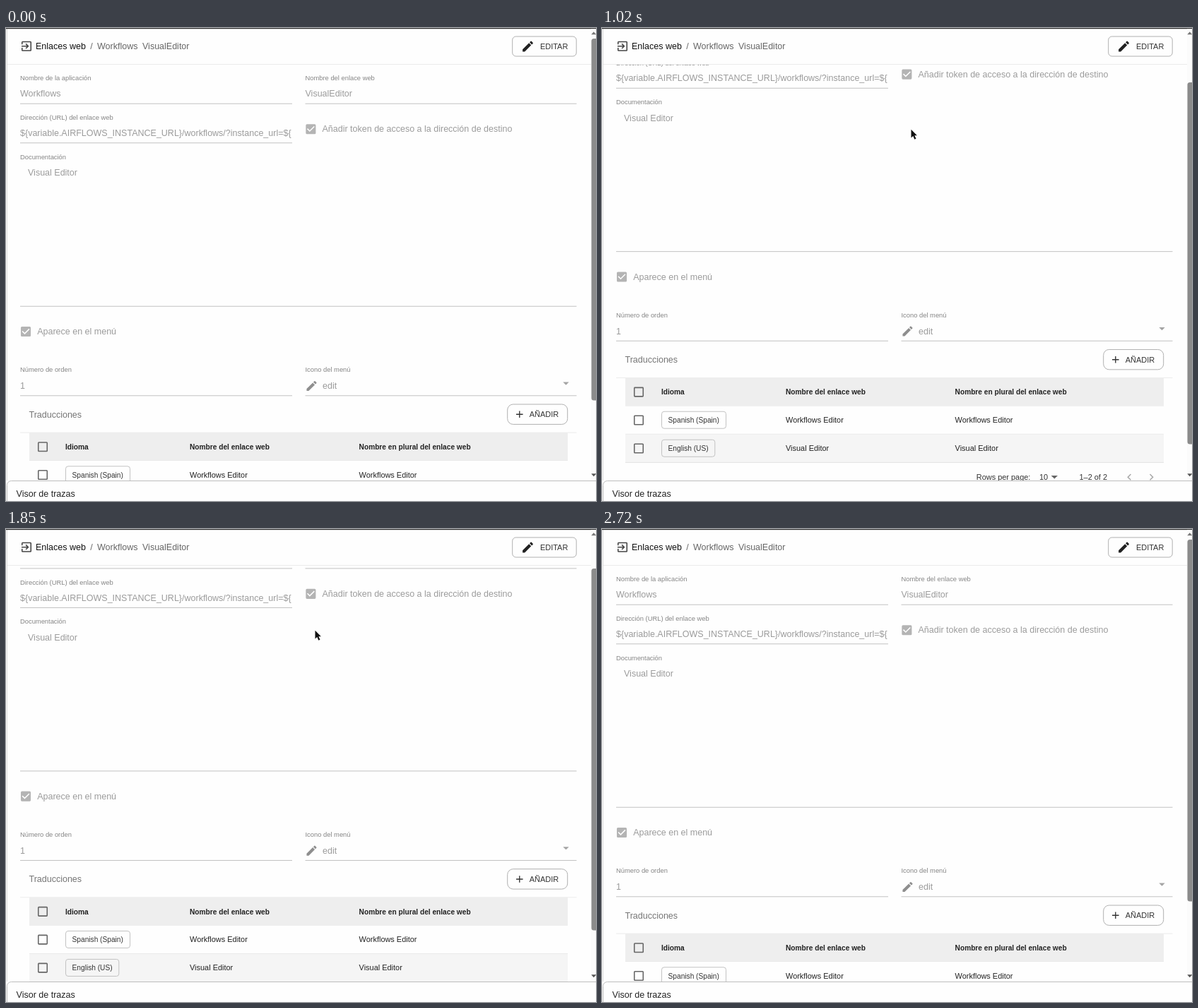
An HTML page that plays this animation: 835 by 670 pixels, repeating every 3010 ms.

```html
<!DOCTYPE html>
<html lang="es">
<head>
<meta charset="utf-8">
<title>Enlaces web</title>
<style>
html, body { margin: 0; width: 100%; height: 100%; overflow: hidden; background: #fefefe; }
svg { display: block; width: 835px; height: 670px; font-family: "Liberation Sans", Arial, sans-serif; }
text { white-space: pre; }
</style>
</head>
<body>
<svg id="stage" viewBox="0 0 835 670">
  <defs>
    <clipPath id="view"><rect x="0" y="51.5" width="828" height="589.5"/></clipPath>
    <clipPath id="urlBox"><rect x="20" y="135" width="385" height="26"/></clipPath>
  </defs>
  <rect width="835" height="670" fill="#fefefe"/>
  <g clip-path="url(#view)"><g id="page"></g></g>
  <g id="head"></g>
  <g id="bar"></g>
  <g id="foot"></g>
  <path id="cursor" d="M0 0V11.8L2.8 9.2L4.8 13.9L7 12.9L4.9 8.4H8.4Z" fill="#111" stroke="#fff" stroke-width="1" stroke-linejoin="round" paint-order="stroke"/>
</svg>
<script>
const LOOP = 3010, MAX_SCROLL = 124.7;
const $ = id => document.getElementById(id);
const BIG = 12.5, MID = 10.94, CELL = 10.16, SMALL = 9.375;
const GREY = "#9b9b9b", LABEL = "#858585", DARK = "#222", SOFT = "#666";

const icons = {
  edit: "M3 17.25V21h3.75L17.81 9.94l-3.75-3.75L3 17.25zM20.71 7.04a1 1 0 0 0 0-1.41l-2.34-2.34a1 1 0 0 0-1.41 0l-1.83 1.83 3.75 3.75 1.83-1.83z",
  checked: "M19 3H5a2 2 0 0 0-2 2v14a2 2 0 0 0 2 2h14a2 2 0 0 0 2-2V5a2 2 0 0 0-2-2zm-9 14l-5-5 1.41-1.41L10 14.17l7.59-7.59L19 8l-9 9z",
  empty: "M19 5v14H5V5h14m0-2H5a2 2 0 0 0-2 2v14a2 2 0 0 0 2 2h14a2 2 0 0 0 2-2V5a2 2 0 0 0-2-2z",
  enter: "M10.09 15.59L11.5 17l5-5-5-5-1.41 1.41L12.67 11H3v2h9.67l-2.58 2.59zM19 3H5a2 2 0 0 0-2 2v4h2V5h14v14H5v-4H3v4a2 2 0 0 0 2 2h14a2 2 0 0 0 2-2V5a2 2 0 0 0-2-2z",
  plus: "M19 13h-6v6h-2v-6H5v-2h6V5h2v6h6v2z",
  down: "M6 9l6 6 6-6z",
  prev: "M15.41 7.41L14 6l-6 6 6 6 1.41-1.41L10.83 12z",
  next: "M10 6L8.59 7.41 13.17 12l-4.58 4.59L10 18l6-6z"
};

const text = (x, y, s, size = BIG, fill = GREY, extra = "") =>
  `<text x="${x}" y="${y}" font-size="${size}" fill="${fill}" ${extra}>${s}</text>`;
const rect = (x, y, w, h, fill, extra = "") =>
  `<rect x="${x}" y="${y}" width="${w}" height="${h}" fill="${fill}" ${extra}/>`;
const box = (x, y, w, h, r, stroke) =>
  rect(x, y, w, h, "#fefefe", `rx="${r}" stroke="${stroke}"`);
const icon = (name, cx, cy, fill, k = 0.78125) =>
  `<path d="${icons[name]}" fill="${fill}" transform="translate(${cx - 12 * k} ${cy - 12 * k}) scale(${k})"/>`;
const line = (x, y, w, fill = "#c2c2c2") => rect(x, y, w, 1, fill);
const label = (x, y, s) => text(x, y, s, SMALL, LABEL);

function row(y, lang, chipWidth, name, fill) {
  return rect(33, y, 762, 40, fill) + line(33, y + 39.4, 762, "#e2e2e2") +
    icon("empty", 52, y + 20, SOFT) +
    rect(84.5, y + 7.8, chipWidth, 24, fill, 'rx="3.5" stroke="#c2c2c2"') +
    text(93.6, y + 23.5, lang, CELL, "#333") +
    [260, 499.6].map(x => text(x, y + 23.7, name, MID, DARK)).join("");
}

$("page").innerHTML = [
  label(20, 73.7, "Nombre de la aplicación"), text(20, 97.3, "Workflows"), line(20, 106.7, 385),
  label(423.5, 73.7, "Nombre del enlace web"), text(423.5, 97.3, "VisualEditor"), line(423.5, 106.7, 384),
  label(20, 130.2, "Dirección (URL) del enlace web"),
  text(20, 153, "${variable.AIRFLOWS_INSTANCE_URL}/workflows/?instance_url=${", BIG, GREY, 'clip-path="url(#urlBox)"'),
  line(20, 162.3, 385),
  icon("checked", 431.4, 143.2, "#b4b4b4"),
  text(447.5, 147.3, "Añadir token de acceso a la dirección de destino"),
  label(20, 185.7, "Documentación"), text(31, 209.2, "Visual Editor"), line(20, 393.7, 787.5),
  icon("checked", 28, 430, "#b4b4b4"), text(44.2, 434.3, "Aparece en el menú"),
  label(20, 487.4, "Número de orden"), text(20, 511.2, "1"), line(20, 520.3, 385),
  label(423.5, 487.4, "Icono del menú"), icon("edit", 432.5, 507, "#8e8e8e"),
  text(448, 511.2, "edit"), line(423.5, 520.3, 384), icon("down", 792.5, 503.6, "#a4a4a4", 0.7),
  text(32.5, 551.8, "Traducciones", BIG, "#757575"),
  box(709.7, 533, 85, 28.4, 8, "#b0b0b0"), icon("plus", 726.8, 547.3, "#333", 0.68),
  text(740.8, 551.1, "AÑADIR", MID, "#333"),
  line(20, 572.6, 787.5, "#ececec"),
  rect(33, 573.2, 762, 40, "#eeeeee"), line(33, 612.6, 762, "#e2e2e2"),
  icon("empty", 52, 593.2, SOFT),
  [[84, "Idioma"], [260, "Nombre del enlace web"], [499.6, "Nombre en plural del enlace web"]]
    .map(([x, s]) => text(x, 596.9, s, CELL, DARK, 'font-weight="bold"')).join(""),
  row(613, "Spanish (Spain)", 91, "Workflows Editor", "#fefefe"),
  row(653, "English (US)", 75.3, "Visual Editor", "#f5f5f5"),
  text(529.8, 717.4, "Rows per page:", MID, "#333"), text(619, 717.4, "10", MID, "#333"),
  icon("down", 640.3, 713.8, SOFT), text(675.5, 717.4, "1–2 of 2", MID, "#333"),
  icon("prev", 746.3, 713.7, "#aaa"), icon("next", 777.6, 713.7, "#aaa")
].join("");

$("head").innerHTML = [
  line(2, 51, 826, "#ebebeb"), rect(1, 1, 1, 640, "#dcdcdc"), rect(0, 0, 835, 1.2, "#2b2b2b"),
  icon("enter", 29, 25.7, "#444"),
  text(42, 30, "Enlaces web", BIG, "#111"), text(119.2, 30, "/", BIG, SOFT),
  text(129, 30, "Workflows", BIG, SOFT), text(193, 30, "VisualEditor", BIG, SOFT),
  box(716.7, 12, 90.5, 28, 5, "#b0b0b0"), icon("edit", 738.5, 26, "#222", 0.82),
  text(756, 30, "EDITAR", MID, "#333")
].join("");

$("bar").innerHTML = rect(828, 1.2, 7, 640, "#fbfbfb") +
  rect(828.5, 15, 10, 512.5, "#8b8b8b", 'id="thumb" rx="3.5"') +
  '<path d="M828.3 9.3h7l-3.5-4z" fill="#777"/><path d="M828.3 631.3h7l-3.5 4z" fill="#555"/>';

$("foot").innerHTML = rect(0, 641, 835, 29, "#fefefe") +
  '<path d="M1.5 671V647.5a6 6 0 0 1 6-6H836" fill="none" stroke="#bdbdbd"/>' +
  text(14.6, 664.3, "Visor de trazas", BIG, DARK);

const clamp = v => Math.max(0, Math.min(1, v));
const span = (t, a, b) => clamp((t - a) / (b - a));

// cubic-bezier(.25, .1, .25, 1)
function ease(x) {
  const curve = (s, a, b) => 3 * (1 - s) ** 2 * s * a + 3 * (1 - s) * s * s * b + s ** 3;
  let lo = 0, hi = 1;
  for (let i = 0; i < 24; i++) {
    const mid = (lo + hi) / 2;
    if (curve(mid, 0.25, 0.25) < x) lo = mid; else hi = mid;
  }
  return x <= 0 ? 0 : x >= 1 ? 1 : curve(hi, 0.1, 1);
}

function draw(t) {
  const scroll = MAX_SCROLL * (ease(span(t, 892, 1250)) - ease(span(t, 1738, 2070)));
  $("page").setAttribute("transform", `translate(0 ${-scroll})`);
  $("thumb").setAttribute("y", 15 + scroll * 0.8);

  const away = (1 - span(t, 250, 390)) ** 2 + span(t, 2230, 2700) ** 2;
  $("cursor").setAttribute("transform", `translate(${437.5 + 400 * away} ${143.8 + 60 * away})`);
  $("cursor").style.display = t >= 270 && t < 2700 ? "" : "none";
}

const start = performance.now();
function tick() {
  draw((performance.now() - start) % LOOP);
  requestAnimationFrame(tick);
}
draw(0);
requestAnimationFrame(tick);
</script>
</body>
</html>
```
